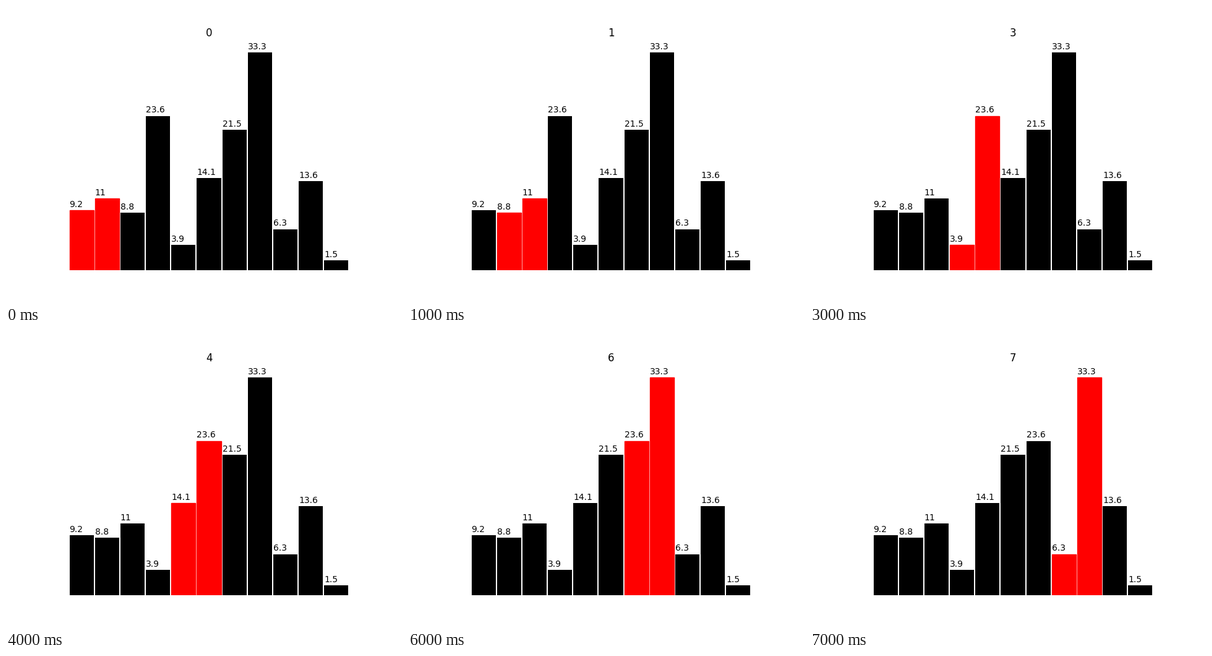
These frames come from a looping animation (640 by 480 pixels, 8 s). A matplotlib script:

```python
import matplotlib.pyplot as plt
from matplotlib.animation import FuncAnimation

START = [9.2, 11, 8.8, 23.6, 3.9, 14.1, 21.5, 33.3, 6.3, 13.6, 1.5]
STEPS = 8
LABEL_GAP = 0.5

fig = plt.figure(figsize=(6.4, 4.8), dpi=100, facecolor="white")
ax = fig.add_subplot()


def values_after(step):
    """Bubble sort's first pass, up to and including this comparison."""
    values = list(START)
    for i in range(step + 1):
        if values[i] > values[i + 1]:
            values[i], values[i + 1] = values[i + 1], values[i]
    return values


def draw(step):
    values = values_after(step)
    ax.clear()
    ax.axis("off")
    ax.set_title(str(step))
    bars = ax.bar(range(len(values)), values, width=0.95,
                  align="edge", color="black")
    for bar in bars[step:step + 2]:
        bar.set_color("red")
    for i, value in enumerate(values):
        ax.text(i, value + LABEL_GAP, f"{value:g}", fontsize=10)


anim = FuncAnimation(fig, draw, frames=STEPS, interval=1000,
                     repeat=True, repeat_delay=0)
plt.show()
```
